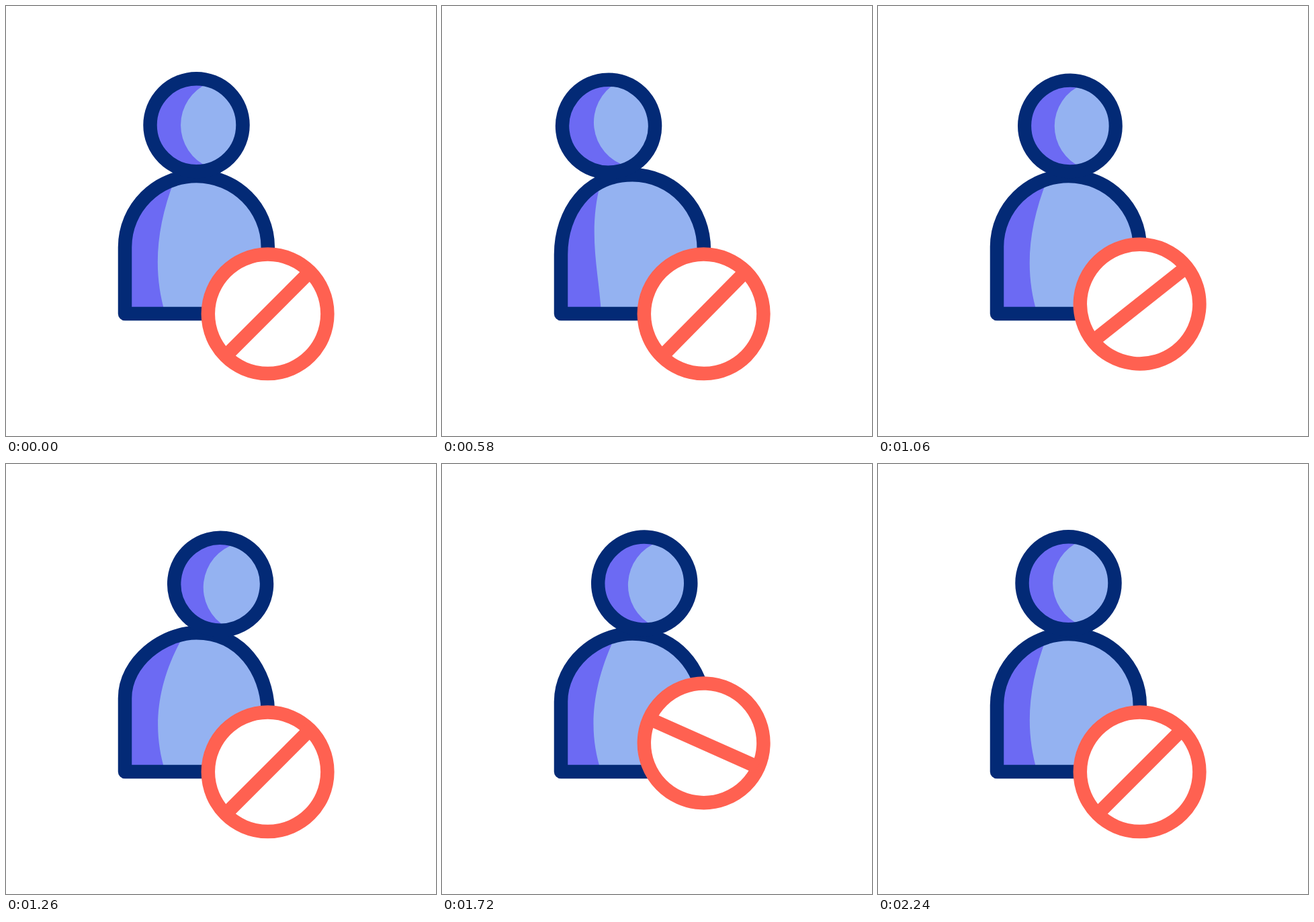
Write an HTML page that moves like this. It is 640 px wide and 640 px high and loops after 2400 ms.

```html
<!DOCTYPE html>
<html lang="en">
<head>
<meta charset="utf-8">
<title>Blocked user</title>
<style>
  html, body { margin: 0; width: 100%; height: 100%; overflow: hidden; background: #fff; }
  svg { display: block; width: 100vw; height: 100vh; }
  .line { fill: none; stroke: #032a76; stroke-width: 20.5; stroke-linejoin: round; }
  .light { fill: #94b2f1; }
  .shade { fill: #6c6af3; }
  .sign { fill: #fff; stroke: #ff6151; stroke-width: 20.5; }
</style>
</head>
<body>
<svg viewBox="0 0 640 640">
  <path id="fill" class="light"/>
  <path id="edge" class="shade"/>
  <path id="outline" class="line"/>
  <g id="head">
    <circle class="light" r="69"/>
    <path id="crescent" class="shade" d="M18 -62.6A68 68 0 0 0 18 62.6A65 65 0 1 1 18 -62.6Z"/>
    <circle class="line" r="69"/>
  </g>
  <g id="ban" class="sign">
    <circle r="88.8"/>
    <path d="M-88 0H88"/>
  </g>
</svg>
<script>
  const LOOP = 2400;
  const part = id => document.getElementById(id);
  const [fill, edge, outline, head, crescent, ban] =
    ["fill", "edge", "outline", "head", "crescent", "ban"].map(part);

  // Smooth 0 to 1 between two times
  const ease = (t, from, to) => {
    const x = Math.min(1, Math.max(0, (t - from) / (to - from)));
    return x * x * (3 - 2 * x);
  };
  const hop = (t, start, peak, end, height) =>
    height * (ease(t, start, peak) - ease(t, peak, end));
  const place = (el, x, y, angle = 0, size = 1) =>
    el.setAttribute("transform", `translate(${x} ${y}) rotate(${angle}) scale(${size})`);

  // lean runs from -1 (left) to 1 (right); bend is its square
  function drawBody(lean, bend) {
    const top = `283.4 ${253 - 1.8 * bend}`;
    const left = `M177 458V${359 - 11 * lean}` +
      `C177 ${300.5 - 6.5 * lean} ${225 + 9 * lean} ${253 - 1.8 * bend} ${top}`;
    const right = `C${342 + 4 * lean + 5 * bend} ${253 - 1.8 * bend} ` +
      `${389.8 - 2 * lean} ${300.5 + 4 * lean + 5 * bend} 389.8 ${359 + 7 * bend}V458Z`;
    const inner = `L${251 + 15 * lean} ${258 - 5 * lean}` +
      `C${222 + 3 * lean - 3 * bend} ${333 - 5 * lean} ${219 - 8 * lean + 7 * bend} 397 237 458Z`;
    fill.setAttribute("d", left + right);
    outline.setAttribute("d", left + right);
    edge.setAttribute("d", left + inner);
  }

  function draw(t) {
    const cross = ease(t, 800, 1300);
    const lean = 2 * cross - ease(t, 200, 600) - ease(t, 1500, 1933);
    const bend = lean * lean;
    const pinch = 4 * cross * (1 - cross);

    drawBody(lean, bend);
    place(head, 283.5 + 36.3 * lean + 0.6 * bend, 177.2 + 1.5 * bend + 1.3 * pinch,
      7 * lean, 1 - 0.017 * pinch);
    place(crescent, -1.7 * lean, 0);

    const lift = hop(t, 600, 860, 1156, 60.4) + hop(t, 1418, 1683, 1978, 45);
    const turn = ease(t, 1316, 1958) - ease(t, 571, 1104);
    place(ban, 389.6, 458.3 - lift, 360 * turn - 45);
  }

  function tick() {
    draw(performance.now() % LOOP);
    requestAnimationFrame(tick);
  }
  tick();
</script>
</body>
</html>
```
